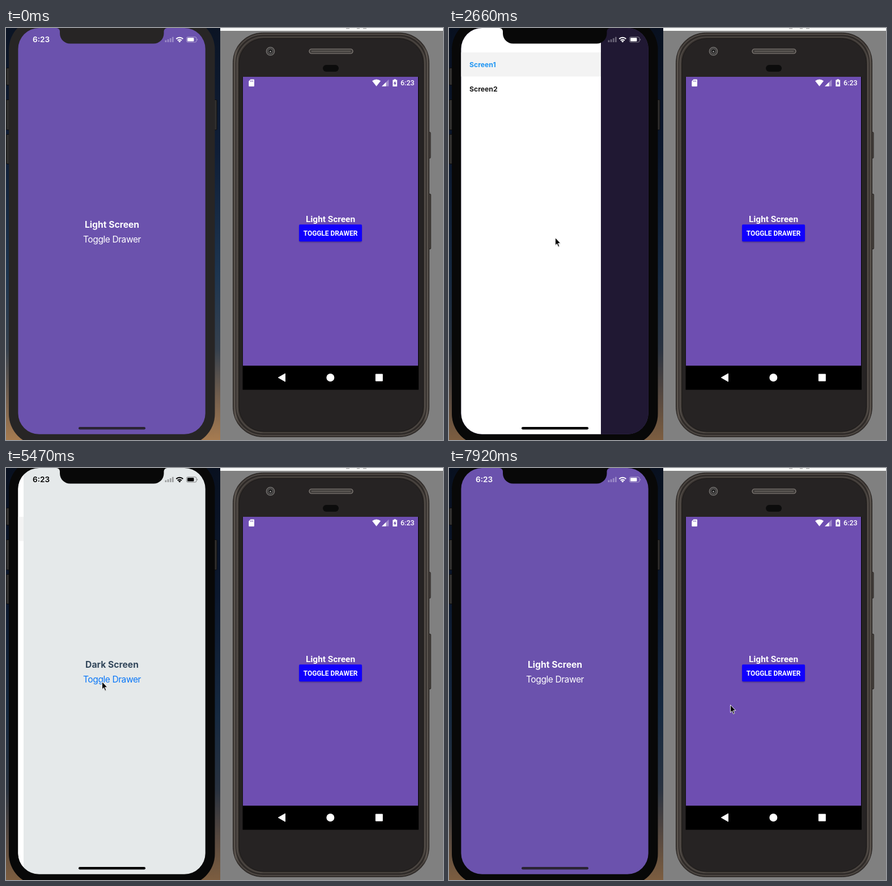
Recreate the animation shown at these times as an HTML page. Size 771 px wide and 726 px high, loop 8000 ms.

```html
<!DOCTYPE html>
<html lang="en">
<head>
<meta charset="utf-8">
<title>Drawer demo</title>
<style>
  html, body { margin: 0; width: 100%; height: 100%; overflow: hidden; background: #808080; }
  svg { display: block; width: 771px; height: 726px; }
  .ios { font-family: Inter, "Liberation Sans", sans-serif; }
  .droid { font-family: Roboto, "Noto Sans", sans-serif; fill: #fff; }
  .mid { text-anchor: middle; }
  .item { font-size: 12.2px; font-weight: 700; }
</style>
</head>
<body>
<svg viewBox="0 0 771 726" xmlns="http://www.w3.org/2000/svg">
  <defs>
    <linearGradient id="sky" x1="0" y1="0" x2="0" y2="1">
      <stop offset="0" stop-color="#0b1424"/>
      <stop offset=".3" stop-color="#0f1e37"/>
      <stop offset=".6" stop-color="#1d3550"/>
      <stop offset=".78" stop-color="#36414e"/>
      <stop offset=".9" stop-color="#75604e"/>
      <stop offset="1" stop-color="#a67b50"/>
    </linearGradient>
    <linearGradient id="rim" x1="0" x2="1">
      <stop offset="0" stop-color="#37322f"/>
      <stop offset=".012" stop-color="#5d5650"/>
      <stop offset=".03" stop-color="#393431"/>
      <stop offset=".97" stop-color="#393431"/>
      <stop offset=".988" stop-color="#5d5650"/>
      <stop offset="1" stop-color="#37322f"/>
    </linearGradient>
    <clipPath id="glass"><rect x="21.4" width="330.3" height="715.8" rx="37"/></clipPath>
    <filter id="soft" x="-10%" y="-20%" width="120%" height="160%"><feGaussianBlur stdDeviation="1.2"/></filter>
  </defs>

  <!-- left phone -->
  <rect width="378" height="726" fill="url(#sky)"/>
  <rect id="wash" width="378" height="726" fill="#020713"/>
  <g fill="#302f2e" stroke="#0c0c0c">
    <rect x=".5" y="70.5" width="7" height="30" rx="1.5"/>
    <rect x=".5" y="126.5" width="7" height="53" rx="1.5"/>
    <rect x=".5" y="187.5" width="7" height="52" rx="1.5"/>
    <rect x="365" y="126.5" width="7" height="53" rx="1.5"/>
  </g>
  <rect id="body" x="5" y="-17" width="363.5" height="752" rx="55"/>
  <g clip-path="url(#glass)" class="ios">
    <rect id="page" x="21" width="332" height="716"/>
    <text id="title" class="mid" x="187" y="351.5" font-size="15.7" font-weight="700"></text>
    <text id="link" class="mid" x="187" y="377.5" font-size="15.6" letter-spacing="-.45">Toggle Drawer</text>
    <rect id="dim" x="21" width="332" height="716"/>
    <g id="drawer">
      <rect x="21" width="247" height="716" fill="#fff"/>
      <rect id="row" x="21" width="247" height="42.5" fill="#f3f3f3"/>
      <text id="item1" class="item" x="36" y="68.5">Screen1</text>
      <text id="item2" class="item" x="36" y="111.5">Screen2</text>
    </g>
    <g id="status">
      <text x="47" y="25.3" font-size="13.6" font-weight="600">6:23</text>
      <path d="M280.5 25v-3.5h2.7V25zM284.7 25v-5h2.7v5zM288.9 25v-7h2.7v7zM293 25v-9.2h2.7V25z" opacity=".32"/>
      <g fill="none" stroke="currentColor" stroke-width="2">
        <path d="M300.3 19.3A8.3 8.3 0 0 1 312.3 19.3"/>
        <path d="M302.8 22A4.9 4.9 0 0 1 309.8 22"/>
      </g>
      <path d="M306.3 25.6L304.1 23.4A3.1 3.1 0 0 1 308.5 23.4Z"/>
      <rect x="318.5" y="15.8" width="17.5" height="9.2" rx="2.5" fill="none" stroke="currentColor" opacity=".45"/>
      <rect x="320" y="17.3" width="11.5" height="6.2" rx="1.3"/>
      <path d="M337.3 18.8Q339.2 20.4 337.3 22Z" opacity=".5"/>
    </g>
    <rect id="home" x="128" y="703" width="118" height="4.4" rx="2.2"/>
  </g>
  <path id="notch" d="M89 -1V0A6 6 0 0 1 95 6V9.5A18 18 0 0 0 113 27.5H260.5A18 18 0 0 0 278.5 9.5V6A6 6 0 0 1 284.5 0V-1Z"/>

  <!-- right phone -->
  <rect x="378" width="393" height="726" fill="#808080"/>
  <rect x="378" width="393" height="5" fill="#f7f8f7"/>
  <path d="M600 0h6v1.5h-6zM619 0h5v1.5h-5zM630 0h6v1.5h-6z" fill="#b5b5b5"/>
  <g fill="#4a4541" stroke="#292523">
    <rect x="743" y="183.5" width="6" height="46" rx="1.5"/>
    <rect x="743" y="292.5" width="6.5" height="97" rx="1.5"/>
  </g>
  <rect x="400.5" y="8.5" width="346" height="712" rx="52" fill="url(#rim)" stroke="#292523"/>
  <g fill="none">
    <rect x="403" y="11" width="341" height="707" rx="50" stroke="#5f5852"/>
    <rect x="405.5" y="13.5" width="336" height="702" rx="48" stroke="#2a2624" stroke-width="1.4"/>
    <rect x="408" y="16" width="331" height="697" rx="46" stroke="#544e49" stroke-width="1.2"/>
  </g>
  <rect x="411" y="18.5" width="325.5" height="692.5" rx="44" fill="#262323" stroke="#1a1817"/>
  <circle cx="466.5" cy="41" r="7.2" fill="#3f3e3e" stroke="#767370" stroke-width="1.3"/>
  <circle cx="466.5" cy="41" r="4" fill="#151515" stroke="#6b6866"/>
  <circle cx="466.5" cy="41.5" r="1.5" fill="#8b8b8b"/>
  <rect x="535" y="37" width="77" height="8" rx="4" fill="#403d3b" stroke="#8c8680" stroke-width="1.2"/>
  <path d="M539 41H608" stroke="#5d5955" stroke-width="2"/>
  <rect x="559" y="65" width="28" height="12" rx="6" fill="#0c0c0c"/>
  <rect x="417.5" y="86" width="310.5" height="551.5" fill="#000"/>
  <rect x="418" y="86" width="309" height="509" fill="#6e4eb1"/>
  <g class="droid">
    <path d="M431.5 90.5H437Q438 90.5 438 91.5V102Q438 103 437 103H429.3Q428.3 103 428.3 102V93.7Z"/>
    <path d="M431.5 92.5v2.3M433.5 92.5v2.3M435.5 92.5v2.3" stroke="#6e4eb1" stroke-width=".9"/>
    <path d="M646 93.3Q653.5 87.8 661 93.3L653.5 102.8Z"/>
    <path d="M663 102.8H675.3V90.8Z" opacity=".35"/>
    <path d="M663 102.8H670.5V95.4Z"/>
    <path d="M684.5 90.3h3.4v1.3h2.2V103h-7.8V91.6h2.2z"/>
    <path d="M686.9 93.2L683.7 98H685.6V101.6L688.8 96.6H686.9Z" fill="#6e4eb1"/>
    <text x="696" y="101.3" font-size="12.5" font-weight="500">6:23</text>
    <text class="mid" x="572.5" y="342.3" font-size="15.4" font-weight="700">Light Screen</text>
    <rect x="517.5" y="348" width="110" height="29.5" rx="2" fill="#201040" opacity=".45" filter="url(#soft)"/>
    <rect x="517" y="346.3" width="111" height="30" rx="1.8" fill="#1100fc"/>
    <text class="mid" x="572.5" y="366.3" font-size="11.9" font-weight="700">TOGGLE DRAWER</text>
    <path d="M480.3 616L492.5 609V623Z" stroke="#fff" stroke-linejoin="round"/>
    <circle cx="572.3" cy="616" r="7"/>
    <rect x="651.8" y="609.5" width="13" height="13" rx="1"/>
  </g>

  <g id="cursor">
    <path d="M0 1V15L3.3 12L5.7 17.3L8 16.3L5.8 11.2H10Z" opacity=".25"/>
    <path d="M.5 .5V14L3.5 11.2L5.7 16.4L7.8 15.5L5.6 10.4H9.8Z" stroke="#fff" stroke-width=".9"/>
  </g>
</svg>
<script>
const LOOP = 8000;
const OPEN = 246;       // drawer width
const SLIDE = 450;      // drawer animation time
const POINTER_STEP = 114, DRAWER_STEP = 175;

const el = {};
for (const n of document.querySelectorAll('svg [id]')) el[n.id] = n;
const set = (id, name, value) => el[id].setAttribute(name, value);
const within = (t, a, b) => t >= a && t < b;
const easeInOut = p => p < .5 ? 4 * p ** 3 : 1 - 4 * (1 - p) ** 3;

// Each pointer move follows a curve from p through c to q, slowing down by `ease`.
const moves = [
  { from: 500, to: 500, p: [248, 711], c: [248, 711], q: [248, 711], ease: 1 },
  { from: 680, to: 1380, p: [248, 711], c: [242, 540], q: [188, 372], ease: 1 },
  { from: 2660, to: 2660, p: [188, 372], c: [188, 372], q: [187, 369], ease: 1 },
  { from: 2800, to: 3480, p: [187, 369], c: [150, 240], q: [104, 110], ease: 1.8 },
  { from: 4280, to: 5080, p: [104, 110], c: [172, 243], q: [169, 376], ease: 1.8 },
  { from: 6000, to: 6700, p: [166, 376], c: [162, 221], q: [97, 67], ease: 3.4 },
  { from: 7490, to: 7920, p: [97, 67], c: [300, 230], q: [496, 417], ease: 1.5 }
];

// `lead` is how far the slide has run when it first shows.
const slides = [
  { from: 1740, to: 2270, open: true, lead: 94 },
  { from: 3690, to: 4040, open: false, lead: 262 },
  { from: 5320, to: 5850, open: true, lead: 94 },
  { from: 6810, to: 7340, open: false, lead: 94 }
];

const latest = (list, t) => list.filter(m => m.from <= t).pop();

function stepOf(m, t, size) {
  const count = Math.round((m.to - m.from) / size);
  const gap = (m.to - m.from) / count || 1;
  return { count, gap, index: Math.min(count, Math.floor((t + 2 - m.from) / gap)) };
}

function pointerAt(t) {
  const m = latest(moves, t);
  if (!m) return null;
  const { count, index } = stepOf(m, t, POINTER_STEP);
  const u = 1 - (1 - (index + 1) / (count + 1)) ** m.ease;
  return m.p.map((a, i) => (1 - u) ** 2 * a + 2 * u * (1 - u) * m.c[i] + u * u * m.q[i]);
}

function drawerAt(t) {
  const m = latest(slides, t);
  if (!m) return 0;
  const { gap, index } = stepOf(m, t, DRAWER_STEP);
  const done = easeInOut(Math.min(1, (m.lead + index * gap) / SLIDE));
  return OPEN * (m.open ? done : 1 - done);
}

function draw(t) {
  const light = !within(t, 3690, 6810);
  const focused = t >= 1620;
  const width = drawerAt(t);
  const pointer = pointerAt(t);
  const ink = light ? '#fff' : '#000';
  const shell = focused ? '#080808' : '#272525';

  set('body', 'fill', shell);
  set('notch', 'fill', shell);
  set('wash', 'opacity', focused ? .25 : 0);
  set('page', 'fill', light ? '#6b52ad' : '#ebf0f1');
  el.title.textContent = light ? 'Light Screen' : 'Dark Screen';
  set('title', 'fill', light ? '#fff' : '#34495e');
  set('link', 'fill', light ? '#fff' : '#0a7aff');
  set('link', 'opacity', within(t, 1620, 1970) || within(t, 5320, 5470) ? .3 : 1);

  set('dim', 'opacity', .7 * width / OPEN);
  set('drawer', 'transform', `translate(${width - OPEN} 0)`);
  set('drawer', 'visibility', width > .1 ? 'visible' : 'hidden');
  set('row', 'y', light ? 43 : 86);
  set('item1', 'fill', light ? '#2196f3' : '#1b1b1b');
  set('item2', 'fill', light ? '#1b1b1b' : '#2196f3');
  set('item1', 'opacity', within(t, 6700, 6810) ? .3 : 1);
  set('item2', 'opacity', within(t, 3480, 3690) ? .3 : 1);

  set('status', 'fill', ink);
  set('status', 'color', ink);
  set('home', 'fill', light && width < OPEN / 2 ? '#2a2433' : '#000');

  set('cursor', 'visibility', pointer ? 'visible' : 'hidden');
  if (pointer) set('cursor', 'transform', `translate(${pointer.map(Math.round)})`);
}

const start = performance.now();
function frame() {
  draw((performance.now() - start) % LOOP);
  requestAnimationFrame(frame);
}
draw(0);
requestAnimationFrame(frame);
</script>
</body>
</html>
```
